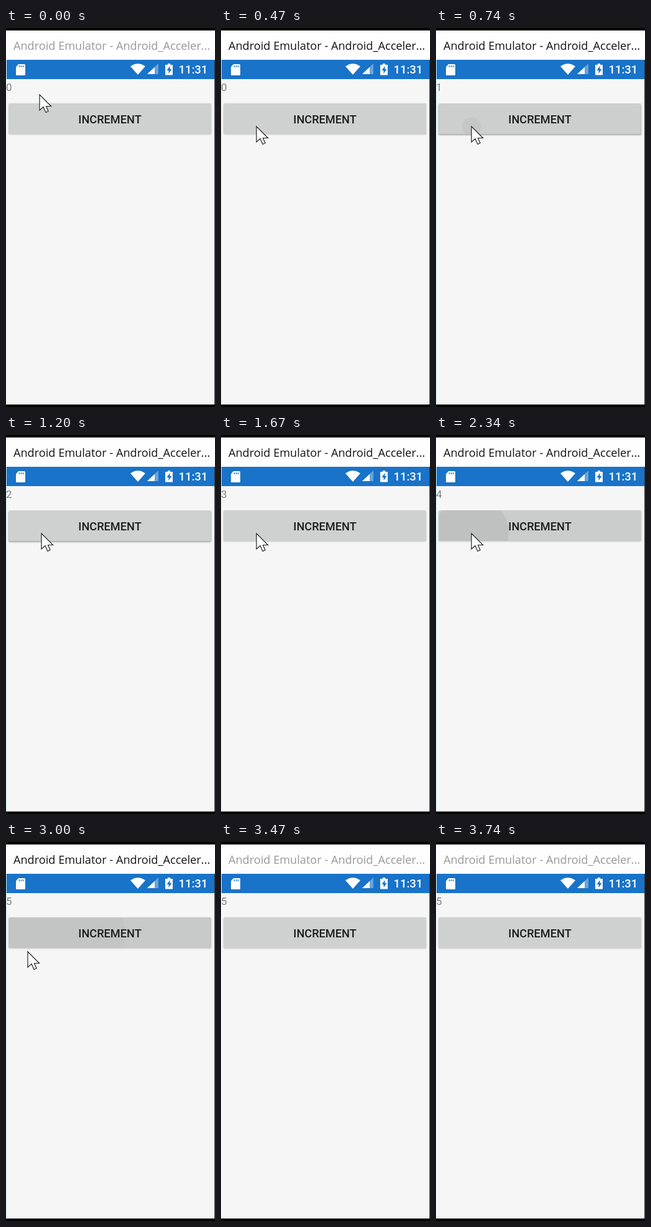
An HTML page that plays this animation: 336x608 px, repeating every 3.81 s.

```html
<!DOCTYPE html>
<html lang="en">
<head>
<meta charset="utf-8">
<title>Counter</title>
<style>
  html, body { margin: 0; width: 100%; height: 100%; overflow: hidden; background: #000; }
  svg { display: block; width: 336px; height: 608px; }
  .title { font: 18.15px "Open Sans", "Noto Sans", sans-serif; fill: #999; }
  .active .title { fill: #141414; }
  .edge { fill: #f6f6f6; }
  .active .edge { fill: #c5eff1; }
  .clock, .label { font: 500 18.4px Roboto, sans-serif; }
  .clock { fill: #fff; }
  .label { font-size: 18.2px; fill: #1b1c1b; text-anchor: middle; }
  .count { font: 17px Roboto, sans-serif; fill: #818181; }
  .icons { fill: #fff; }
  .shadow { fill: #000; opacity: .2; filter: url(#soft); }
  .lifted .shadow { opacity: .3; transform: translateY(1px); }
</style>
</head>
<body>
<svg id="stage" viewBox="0 0 336 608">
  <defs>
    <filter id="soft" x="-5%" y="-20%" width="110%" height="140%"><feGaussianBlur stdDeviation="1"/></filter>
    <clipPath id="face"><rect x="4.5" y="121" width="325" height="49" rx="2"/></clipPath>
  </defs>
  <rect width="336" height="608"/>
  <rect y="4" width="336" height="47" fill="#fefefe"/>
  <text class="title" x="12" y="35">Android Emulator - Android_Acceler...</text>

  <rect y="51" width="335" height="31" fill="#1973c8"/>
  <g class="icons">
    <path d="M20 58h9.5q1.5 0 1.5 1.500v15q0 1.500-1.500 1.500h-12q-1.500 0-1.500-1.500v-12z"/>
    <path d="M21.500 60v3M24.500 60v3M27.500 60v3" stroke="#1973c8" stroke-width="1.300"/>
    <path d="M200 61.500q12-8.500 24 0L212 75z"/>
    <path d="M245 57v17h-18z" opacity=".35"/>
    <path d="M239 62.700V74h-12z"/>
    <path d="M260 57h4v2h4v16.500h-12V59h4z"/>
    <path d="M263.500 61l-5 7h3v5l5-7h-3z" fill="#1973c8"/>
  </g>
  <text class="clock" x="277.5" y="73">11:31</text>

  <rect y="82" width="335" height="522" fill="#f6f6f6"/>
  <rect class="edge" y="51" width="1" height="553"/>
  <rect x="335" y="51" width="1" height="553" fill="#333"/>
  <text class="count" id="count" x="0" y="101">0</text>

  <rect class="shadow" x="4" y="121.500" width="326" height="49.500" rx="2"/>
  <g clip-path="url(#face)">
    <rect x="4" y="121" width="326" height="49" fill="#ced1cf"/>
    <rect id="glow" x="4" y="121" width="326" height="49" opacity="0"/>
    <circle id="spot" cx="57" cy="158" r="0" opacity="0"/>
  </g>
  <text class="label" x="167" y="153">INCREMENT</text>

  <path id="cursor" d="M0 0V25L6 19.500L10 28.500L14 26.500L10.500 18.500H18.500Z"
        fill="#fff" stroke="#222" stroke-width="1.200"/>
</svg>
<script>
  const LOOP = 3810, FPS = 15, LAST = 56;
  const clicks = [9, 17, 25, 32, 41];
  const focusOn = 7, focusOff = 52;
  // Cursor stops: step, x, y
  const path = [
    [0, 54, 107], [1, 55, 122], [2, 57, 147], [3, 57, 158],
    [42, 57, 158], [45, 35, 176], [46, 29, 175], [49, -22, 165]
  ];
  // Opacity by steps since the click
  const glowFade = [0, 0, .01, .02, .04, .035, .02, .01];
  const spotFade = [0, 0, .04, .06, .02, .015, .01];

  const get = id => document.getElementById(id);
  const [stage, count, glow, spot, cursor] = ["stage", "count", "glow", "spot", "cursor"].map(get);

  function cursorAt(step) {
    const i = path.findIndex(p => p[0] > step);
    if (i < 0) return path[path.length - 1].slice(1);
    const [s0, x0, y0] = path[i - 1], [s1, x1, y1] = path[i];
    const k = (step - s0) / (s1 - s0);
    return [x0 + (x1 - x0) * k, y0 + (y1 - y0) * k];
  }

  function draw(step) {
    const done = clicks.filter(c => c <= step).length;
    const age = done ? step - clicks[done - 1] : 99;
    stage.classList.toggle("active", step >= focusOn && step < focusOff);
    stage.classList.toggle("lifted", age === 1 || age === 2);
    count.textContent = done;
    glow.setAttribute("opacity", glowFade[age] || 0);
    spot.setAttribute("opacity", spotFade[age] || 0);
    spot.setAttribute("r", age > 1 && age < 9 ? 15 * (age - 1) ** 2 : 0);
    cursor.setAttribute("transform", `translate(${cursorAt(step)})`);
  }

  function tick() {
    const t = performance.now() % LOOP;
    draw(Math.min(LAST, Math.floor(t * FPS / 1000 + 1e-6)));
    requestAnimationFrame(tick);
  }
  tick();
</script>
</body>
</html>
```
